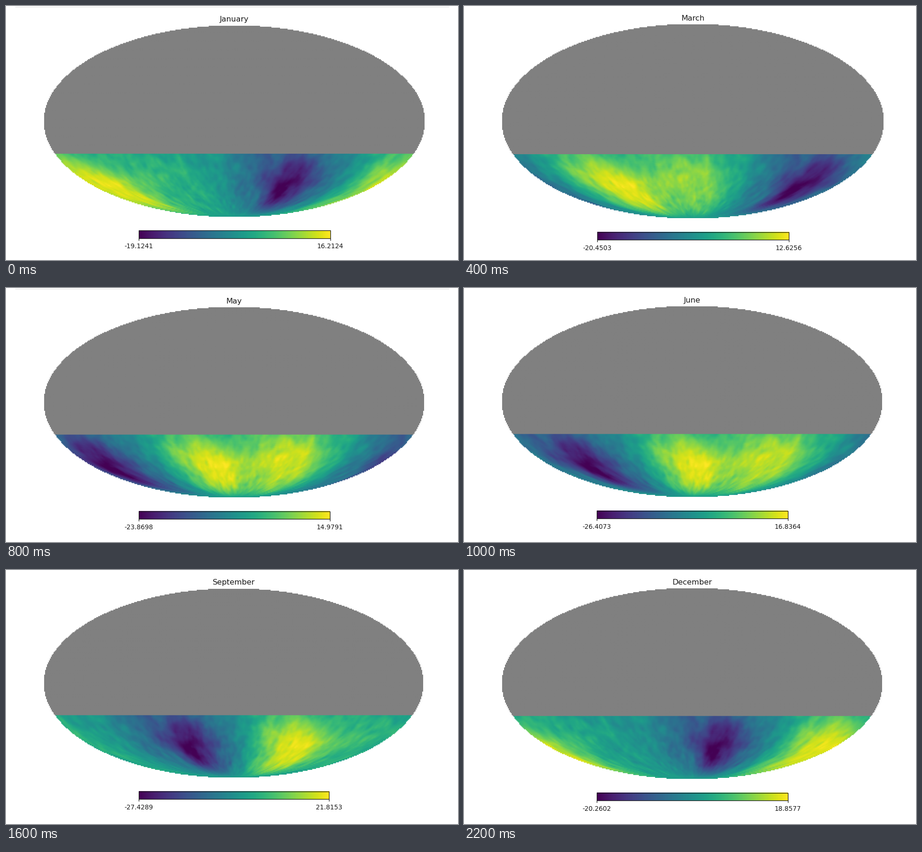
Write a matplotlib script that moves like this. It is 960 px wide and 540 px high and loops after 2400 ms.

```python
import numpy as np
import matplotlib.pyplot as plt
from matplotlib.animation import FuncAnimation
from matplotlib.patches import Rectangle

W, H, DPI = 960, 540, 100
COLS, ROWS, CUT_ROW = 400, 200, 134
LEFT = 81.2
INK = "#1a1a1a"
CMAP = plt.get_cmap("viridis")

# name, low, high, lower edge of the map
MONTHS = [
    ("January", -19.1241, 16.2124, 447.7),
    ("February", -18.6127, 13.9058, 445),
    ("March", -20.4503, 12.6256, 451.5),
    ("April", -22.7431, 13.4182, 448),
    ("May", -23.8698, 14.9791, 445.5),
    ("June", -26.4073, 16.8364, 444.5),
    ("July", -27.8855, 18.0085, 445.7),
    ("August", -28.1936, 20.4471, 441.5),
    ("September", -27.4289, 21.8153, 441.2),
    ("October", -25.9172, 22.0385, 443),
    ("November", -23.8064, 21.4192, 442.7),
    ("December", -20.2602, 18.8577, 444.5),
]
RULED = {"January", "May", "August", "November"}

# Mollweide grid
u, v = np.meshgrid(np.linspace(-.9956, .9956, COLS), np.linspace(-.9907, .9907, ROWS))
inside = u**2 + v**2 <= 1
data = inside & (np.arange(ROWS)[:, None] >= CUT_ROW)
lon = 180 * u / np.sqrt(1 - v**2)
theta = np.arcsin(v)
lat = -np.degrees(np.arcsin((2 * theta + np.sin(2 * theta)) / np.pi))
pole_fade = 1 - np.exp(-((90 + lat) / 8)**2)


def make_noise(seed=4):
    """Smooth cloudy texture on a half degree grid, periodic in longitude."""
    rng = np.random.default_rng(seed)
    spec = np.fft.fft2(rng.standard_normal((180, 720)))
    k = np.hypot(np.fft.fftfreq(180, .5)[:, None], np.fft.fftfreq(720, .5))
    spec *= np.where(k > .015, np.exp(-(k / .2)**2) / np.maximum(k, .015), 0)
    tex = np.fft.ifft2(spec).real
    return tex / tex.std()


NOISE = make_noise()


def field(month):
    """Sky pattern drifting about 30 degrees a month, with a seasonal bright lobe."""
    season = np.cos(2 * np.pi * (month - 4) / 12)
    turn = lon - (75 + 30 * month + 11 * season)
    sheared = turn + .3 * (lat + 53)

    def blob(amp, lon0, lat0, lon_w, lat_w):
        d = (sheared - lon0 + 180) % 360 - 180
        return amp * np.exp(-.5 * ((d / lon_w)**2 + ((lat - lat0) / lat_w)**2))

    total = (blob(-.32, -4, -48, 46, 30)                    # wide trough
             + blob(-.22, 0, -53, 18, 16)                   # its core
             + blob(.42, 127, -53, 35, 27)                  # main ridge
             + blob(.18 + .2 * season, 225, -50, 35, 27)    # seasonal lobe
             + blob(-.14, 145, -27, 15, 8))                 # notch at the cut
    row = np.clip(-2 * lat, 0, 179).astype(int)
    col = np.floor(2 * turn).astype(int) % 720
    return np.clip(.55 + (total + .027 * NOISE[row, col]) * pole_fade, 0, 1)


def sky_image(month):
    rgb = np.ones((ROWS, COLS, 3))
    rgb[inside] = 128 / 255
    rgb[data] = CMAP(field(month)[data])[:, :3]
    return rgb.repeat(2, axis=0).repeat(2, axis=1)


IMAGES = [sky_image(m) for m in range(len(MONTHS))]
RAMP = np.linspace(0, 1, 256)[None, :]

fig = plt.figure(figsize=(W / DPI, H / DPI), dpi=DPI, facecolor="white")
ax = fig.add_axes([0, 0, 1, 1])


def label(x, y, text, px):
    ax.text(x, y, text, fontsize=px * 72 / DPI, family="DejaVu Sans",
            color=INK, ha="center", va="baseline")


def draw(month):
    name, low, high, bottom = MONTHS[month]
    ruled = name in RULED
    top = 42.2 if ruled else 40.2
    right = 887.5 + .5 * (bottom - 444.5)
    ax.clear()
    ax.axis("off")
    ax.imshow(IMAGES[month], extent=(LEFT, right, bottom, top), aspect="auto",
              interpolation="bilinear")
    label((LEFT + right) / 2, top - 9.3, name, 16.3)

    bar_w, bar_h = .503 * (right - LEFT), 16.5
    x0, y0 = (LEFT + right - bar_w) / 2 + .4, bottom + 29.4
    ax.imshow(RAMP, extent=(x0, x0 + bar_w, y0 + bar_h, y0), aspect="auto",
              cmap=CMAP, interpolation="nearest")
    ax.add_patch(Rectangle((x0, y0), bar_w, bar_h, fill=False, ec=INK, lw=.9))
    for x, value in ((x0, low), (x0 + bar_w, high)):
        ax.plot([x, x], [y0 + bar_h, y0 + bar_h + 4], color=INK, lw=.9)
        label(x, y0 + 38.2, f"{value:.4f}", 13.6)

    if ruled:
        ax.plot([20, 940], [1.5, 1.5], color="#e4e4e4", lw=.8)
    ax.set_xlim(0, W)
    ax.set_ylim(H, 0)
    return []


anim = FuncAnimation(fig, draw, frames=len(MONTHS), interval=200, repeat=True,
                     repeat_delay=0, init_func=lambda: draw(0))
plt.show()
```
